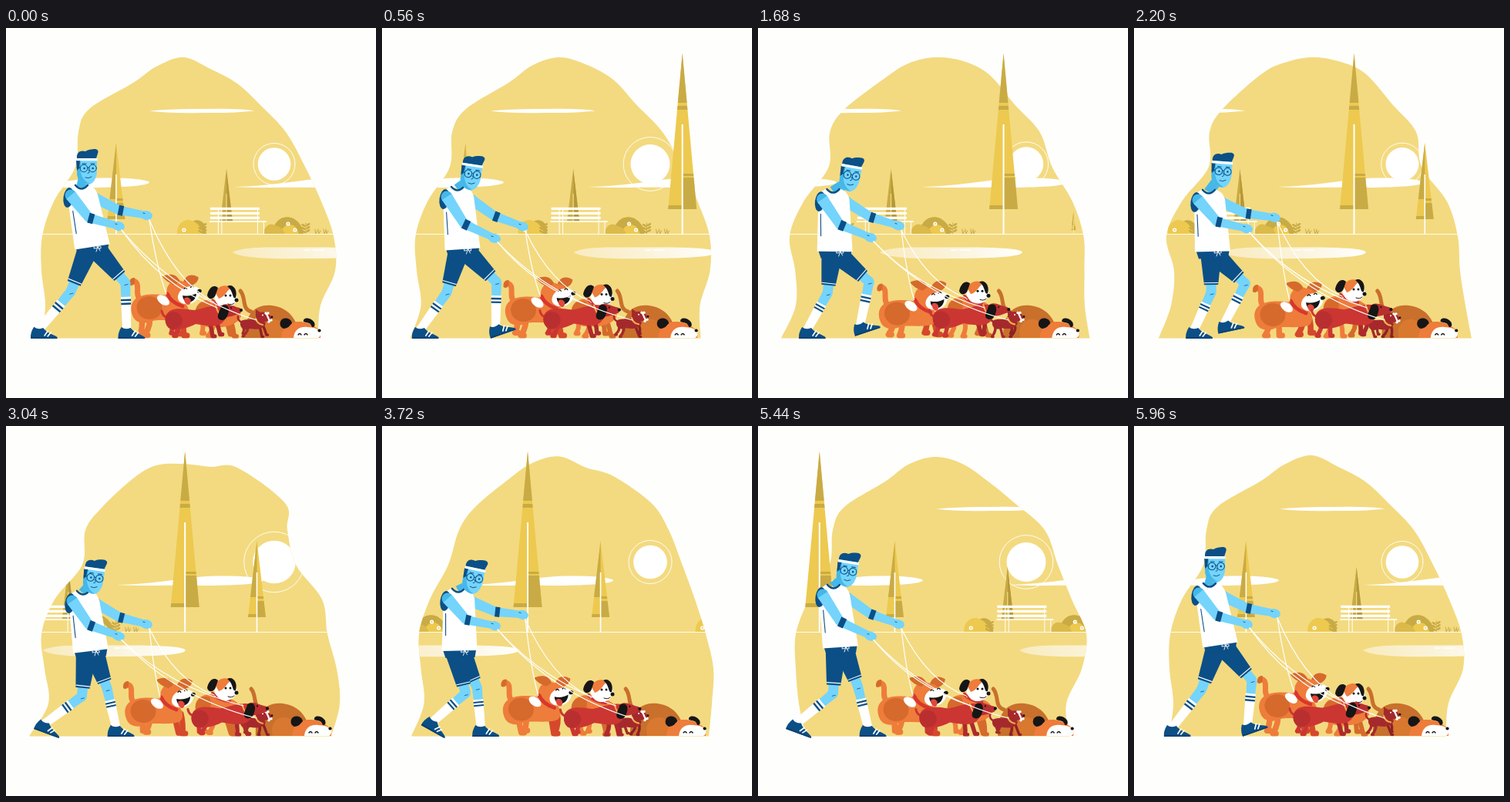
Recreate the animation shown at these times as an HTML page with a canvas. Size 480 by 480 pixels, loop 6000 ms.

```html
<!DOCTYPE html>
<html lang="en">
<head>
<meta charset="utf-8">
<title>Dog walk</title>
<style>
html, body { margin: 0; width: 100%; height: 100%; overflow: hidden; background: #fefefd; }
canvas { display: block; width: 100vmin; height: 100vmin; }
</style>
</head>
<body>
<canvas id="stage"></canvas>
<script>
const LOOP = 6000, STEP = 600, GROUND = 402.4, HORIZON = 267, TAU = Math.PI * 2;
const SAND = '#f3da80', GOLD = '#edc94f', DARK = '#c9ab45', DEEP = '#b6983a', WHITE = '#fff';
const NAVY = '#0b4f86', SKIN = '#74d4fb', SHADE = '#45b7e8', INK = '#161616';
const ORANGE = '#ee7c3b', RUST = '#d56a2c', RED = '#cb3632', WINE = '#a5292c', BROWN = '#c8702c';

const canvas = document.getElementById('stage');
const ratio = Math.max(1, window.devicePixelRatio || 1);
canvas.width = canvas.height = 480 * ratio;
const c = canvas.getContext('2d');

const mix = (a, b, k) => a + (b - a) * k;
const mixPt = (p, q, k) => [mix(p[0], q[0], k), mix(p[1], q[1], k)];
const rad = d => d * Math.PI / 180;
const mod = (a, n) => ((a % n) + n) % n;
const clamp = k => Math.max(0, Math.min(1, k));
const smooth = k => k * k * (3 - 2 * k);
const easeOut = k => 1 - (1 - clamp(k)) ** 2;

// Key poses share these times; the last one wraps to the first.
const times = [0, 1120, 2200, 3040, 4400, 5440, LOOP];
function keyed(rows, t) {
  let i = 0;
  while (t >= times[i + 1]) i++;
  const e = smooth((t - times[i]) / (times[i + 1] - times[i]));
  const next = rows[(i + 1) % rows.length];
  return rows[i].map((v, j) => mix(v, next[j], e));
}

// Blob outline: x at left heights, y across the top, x at right heights.
const leftY = [GROUND, 360, 315, 270, 225, 180, 135, 105];
const topX = [165, 195, 230, 265, 300];
const rightY = [100, 135, 180, 225, 270, 315, 360, GROUND];
const blobs = [
  [45, 51, 46, 47, 62, 90, 94, 108, 71, 50, 38, 53, 72, 330, 363, 388, 409, 425, 427, 408, 405],
  [28, 50, 44, 40, 56, 86, 88, 110, 70, 47, 38, 42, 62, 331, 365, 391, 410, 425, 424, 417, 422],
  [32, 48, 52, 42, 62, 97, 98, 115, 60, 45, 38, 43, 59, 336, 366, 373, 406, 420, 423, 430, 438],
  [30, 55, 50, 46, 63, 99, 103, 125, 68, 51, 49, 53, 54, 362, 365, 376, 410, 417, 429, 433, 422],
  [46, 54, 51, 50, 61, 73, 97, 117, 69, 45, 30, 55, 76, 337, 379, 403, 402, 423, 431, 423, 426],
  [62, 53, 49, 49, 66, 93, 97, 112, 72, 50, 40, 49, 73, 333, 372, 389, 407, 426, 420, 400, 404]
];

// neck x y, hip x y, hip tilt, head x y tilt, big dog x y, spotted dog y
const poses = [
  [97, 204, 112, 284, -9, 105, 180, 0, 0, 0, 0],
  [97, 208, 97, 290, 2, 127, 195, 17, -5, 6, -3],
  [96, 210, 102, 290, -1, 114, 184, 4, -6, 9, -8],
  [99, 214, 110, 292, -7, 114, 195, 8, -8, 7, -7],
  [97, 208, 91, 291, 5, 124, 195, 16, -3, 2, -3],
  [97, 206, 107, 287, -4, 116, 186, 9, -7, 5, -6]
];

// Foot path over two steps: time, x, y, tilt, knee bend
const footKeys = [
  [0, 163, 403, 0, 20], [40, 149, 403, 0, 3], [200, 120, 403, 0, 13], [600, 49, 403, 0, 9],
  [640, 52, 399, 20, 23], [800, 79, 394, 38, 33], [1000, 126, 393, -12, 34],
  [1120, 150, 395, -22, 25], [1160, 157, 397, -20, 22], [1200, 163, 403, 0, 20]
];

function fill(d, color) { c.fillStyle = color; c.fill(new Path2D(d)); }
function line(d, color, w) { c.strokeStyle = color; c.lineWidth = w; c.stroke(new Path2D(d)); }
function oval(x, y, rx, ry, color, turn = 0) {
  c.fillStyle = color;
  c.beginPath();
  c.ellipse(x, y, rx, ry, rad(turn), 0, TAU);
  c.fill();
}
function dot(x, y, r, color) { oval(x, y, r, r, color); }
function ring(x, y, r, color, w) {
  c.strokeStyle = color;
  c.lineWidth = w;
  c.beginPath();
  c.arc(x, y, r, 0, TAU);
  c.stroke();
}
function rect(x, y, w, h, color) { c.fillStyle = color; c.fillRect(x, y, w, h); }
function at(x, y, draw, turn = 0) {
  c.save();
  c.translate(x, y);
  c.rotate(rad(turn));
  draw();
  c.restore();
}
function scaled(x, y, k, draw) {
  if (k <= 0) return;
  c.save();
  c.translate(x, y);
  c.scale(k, k);
  c.translate(-x, -y);
  draw();
  c.restore();
}
// Tapered limb segment between two fractions of p-q.
function limb(p, q, w1, w2, color, from = 0, to = 1) {
  const n = Math.hypot(q[0] - p[0], q[1] - p[1]) || 1;
  const nx = -(q[1] - p[1]) / n, ny = (q[0] - p[0]) / n;
  const a = mixPt(p, q, from), b = mixPt(p, q, to);
  const u = mix(w1, w2, from) / 2, v = mix(w1, w2, to) / 2;
  c.fillStyle = color;
  c.beginPath();
  c.moveTo(a[0] + nx * u, a[1] + ny * u);
  c.lineTo(b[0] + nx * v, b[1] + ny * v);
  c.lineTo(b[0] - nx * v, b[1] - ny * v);
  c.lineTo(a[0] - nx * u, a[1] - ny * u);
  c.fill();
}
// Middle joint: halfway along p-q, pushed sideways by bend.
function joint(p, q, bend) {
  const dx = q[0] - p[0], dy = q[1] - p[1], d = Math.hypot(dx, dy);
  const [x, y] = mixPt(p, q, .48);
  return [x + dy / d * bend, y - dx / d * bend];
}

function blobPath(t) {
  const b = keyed(blobs, t);
  const pts = [
    ...leftY.map((y, i) => [b[i], y]),
    ...topX.map((x, i) => [x, b[8 + i]]),
    ...rightY.map((y, i) => [b[13 + i], y])
  ];
  const path = new Path2D(), last = pts.length - 1;
  path.moveTo(...pts[0]);
  for (let i = 0; i < last; i++) {
    const p0 = pts[Math.max(0, i - 1)], p1 = pts[i], p2 = pts[i + 1], p3 = pts[Math.min(last, i + 2)];
    path.bezierCurveTo(
      p1[0] + (p2[0] - p0[0]) / 6, p1[1] + (p2[1] - p0[1]) / 6,
      p2[0] - (p3[0] - p1[0]) / 6, p2[1] - (p3[1] - p1[1]) / 6, ...p2);
  }
  path.closePath();
  return path;
}

// Repeats a prop that travels one period to the left per loop.
function scroll(t, x, period, draw) {
  for (let k = 0; k < 3; k++) {
    const px = x + period * (k - t / LOOP);
    at(px, 0, () => draw(px));
  }
}
// Towers grow out of the horizon on the right and sink back on the left.
function tower(t, x, period, draw) {
  scroll(t, x, period, px => {
    scaled(0, HORIZON, Math.min(easeOut((px - 58) / 22), easeOut((412 - px) / 20)), draw);
  });
}

function tallTower() {
  fill('M0 33L18.5 235H-18.5Z', GOLD);
  fill('M0 33L5.9 97H-5.9Z', DARK);
  fill('M6.2 101L6.7 106H-6.7L-6.2 101Z', DARK);
  fill('M0 189H14.3L14.6 192H0ZM0 194H14.8L18.5 235H0Z', DARK);
  fill('M-18 230H0V235H-18.5Z', DARK);
  rect(-1, 125, 2, 142, WHITE);
}
function midTower() {
  fill('M0 149L11.5 248H-11.5Z', GOLD);
  fill('M0 149V222H-8.5Z', DARK);
  fill('M0 227H9.1L11.5 248H0ZM0 221H8.4L8.7 224H0Z', DARK);
  fill('M-11 244H0V248H-11.5Z', DARK);
  rect(-.8, 190, 1.6, 77, WHITE);
}
function smallTower() {
  fill('M0 183L8 251H-8Z', DARK);
  fill('M0 183L8 251H1Z', DEEP);
  rect(-.6, 215, 1.2, 52, SAND);
}
function flower(x, y) { dot(x, y, 2.6, WHITE); dot(x, y, 1.1, GOLD); }
function sprig(x) {
  for (let i = 0; i < 3; i++) {
    oval(x - 3, 264 - i * 4, 3, 1.4, DARK, 30);
    oval(x + 3, 263 - i * 4, 3, 1.4, DARK, -30);
  }
  line(`M${x} 267V253`, DARK, 1);
}
function bench() {
  for (const y of [232.8, 238.8, 244.8]) rect(1, y, 64, 3.2, WHITE);
  rect(0, 250.3, 74, 1.6, WHITE);
  for (const x of [11, 15.5, 62]) rect(x, 233, 1, 34, WHITE);
  rect(70, 251, 1, 16, WHITE);
}
function parkProps(px) {
  fill('M-30 267C-27 249-15 245-7 254Q-4 260-4 267Z', DARK);
  fill('M-42 267C-43 253-31 246-23 250C-14 253-9 260-9 267Z', GOLD);
  flower(-33, 262);
  sprig(-9);
  fill('M82 267C82 250 96 241 109 247Q121 254 122 267Z', DARK);
  fill('M92 267C94 254 111 248 116 267Z', GOLD);
  fill('M70 267C71 256 80 251 87 257Q94 257 98 267Z', '#dcba4a');
  flower(102, 254);
  flower(111, 262);
  sprig(125);
  for (const x of [138, 142, 149, 152]) line(`M${x} 267l-1-6M${x} 267l2-4`, DARK, 1);
  scaled(37, HORIZON, easeOut((388 - px) / 20), bench);
}
function pond() {
  const g = c.createLinearGradient(0, 0, 185, 0);
  g.addColorStop(0, '#f9ebbf');
  g.addColorStop(.5, '#fbf3d9');
  g.addColorStop(1, WHITE);
  fill('M0 291C15 282 60 285 95 284.5C150 284 185 286 185 291C185 297 140 299 95 299C45 300 10 298 0 291Z', g);
  line('M93 288H100M104 288H117', WHITE, 1.4);
}

function scenery(t) {
  c.save();
  c.clip(blobPath(t));
  rect(0, 0, 480, 480, SAND);
  const pulse = smooth((1 - Math.cos(t / 2000 * TAU)) / 2);
  dot(348, 176.5, 21.3 + 6.5 * pulse, WHITE);
  ring(348, 176.5, 27 + 12.3 * pulse, WHITE, .9);
  scroll(t, 186, 486, () => fill('M0 107.5Q30 104.5 70 105Q118 104 136 107.5Q110 110.5 70 110Q25 111 0 107.5Z', WHITE));
  scroll(t, -4, 300, () => fill('M0 206C45 205 75 199 105 196C135 193 185 195 190 200C190 205 150 207 110 207C70 206 40 208 0 206Z', WHITE));
  tower(t, 286, 405, smallTower);
  scroll(t, 264, 486, parkProps);
  rect(0, HORIZON, 480, .9, WHITE);
  scroll(t, 294, 486, pond);
  c.restore();
  tower(t, 44.3, 381, tallTower);
  tower(t, 143, 370, midTower);
}

function paws(t, xs, top, w, colors, base = 400) {
  xs.forEach((x, i) => {
    const a = t / STEP * TAU + i * 2.4;
    const fx = x + 6 * Math.sin(a), fy = base - 4 * Math.max(0, Math.cos(a));
    line(`M${x} ${top}Q${x + 3} ${(top + fy) / 2} ${fx} ${fy}l${w * .5} 0`, colors[i % 2], w);
  });
}

function sniffer(t) {
  const x = 7 * (1 - Math.cos(t / LOOP * TAU));
  at(x, 0, () => {
    line('M318 368C305 364 312 350 304 341', BROWN, 5);
    fill('M310 402C308 374 322 357 345 360C368 363 380 380 379 402Z', BROWN);
    fill('M332 402C328 388 336 376 350 378C362 382 364 394 362 402Z', '#d9782f');
    fill('M357 402C358 386 370 380 383 381C396 382 405 390 408 394V402Z', ORANGE);
    fill('M373 402C374 391 382 387 391 388Q403 388 408 394Q409 400 405 402Z', WHITE);
    fill('M371 383C368 386 366 390 360 390C355 388 354 382 358 378C363 375 370 377 371 383Z', INK);
    fill('M386 381C385 375 395 375 400 382Q402 388 397 388C395 381 391 383 386 381Z', INK);
    line('M379 398q2-3 4 0M387 398q2-3 4 0', INK, 1.4);
    dot(406.5, 392.5, 2.1, INK);
  });
}

function spotted(t, y) {
  paws(t, [254, 292, 268, 286], 380, 6, [ORANGE, RUST]);
  at(0, y * .6, () => {
    fill('M246 372C244 356 258 350 272 353C292 356 304 362 305 374C300 386 282 390 262 388Q248 386 246 372Z', ORANGE);
    fill('M246 372C244 360 254 353 264 356C270 368 260 384 252 384Z', RUST);
  });
  at(0, y, () => {
    line('M268 354Q274 362 290 364', RED, 4.5);
    for (let i = 0; i < 3; i++) dot(271 + 6 * i, 357.5 + 2.3 * i, .8, WHITE);
    oval(285, 349, 14.5, 14, WHITE, 20);
    fill('M272 344C273 335 285 331 292 337C286 341 284 349 276 351Z', ORANGE);
    fill('M275 337C268 331 262 340 261 347C264 355 271 350 272 346Z', INK);
    fill('M287 335C295 331 301 341 298 350C293 352 296 342 287 335Z', INK);
    dot(285, 347, 1.5, INK);
    dot(291, 347, 1.5, INK);
    dot(299, 353, 2.5, INK);
    line('M288 358q5 2 8-1', INK, 1);
  });
}

function bigDogHead() {
  oval(222, 341, 15, 15, ORANGE);
  line('M208 345Q213 357 229 362', '#d9372c', 5);
  fill('M219 333C213 330 207 329 201 321C210 316 221 317 225 327Z', RUST);
  fill('M230 328C233 319 242 316 251 322C250 332 239 334 235 334Z', RUST);
  fill('M215 338C218 328 231 325 238 331L246 338L226 351Z', ORANGE);
  fill('M223 346C226 336 241 331 251 337C256 345 249 357 238 359C227 360 220 354 223 346Z', WHITE);
  fill('M229 347Q240 349 248 344C248 352 242 357 236 357Q229 354 229 347Z', INK);
  fill('M231 351Q236 347 240 353Q241 360 236 360Q231 358 231 351Z', '#e0483c');
  oval(252, 341, 3.2, 2.5, INK, -20);
  line('M231 338q2-3 4 0M240 336q2-3 4 0', INK, 1.4);
}

function bigDog(t, x, y) {
  paws(t, [175, 227, 186, 218], 370 + y / 2, 7.5, [ORANGE, '#d5482c'], 399);
  at(x, y, () => {
    line('M174 352C166 345 176 331 165 328', ORANGE, 7);
    fill('M160 333Q159 324 167 324L167 331Q164 336 160 333Z', RUST);
    fill('M170 350C182 343 205 345 222 350C236 355 241 369 234 376C222 382 200 377 190 380C180 385 169 383 165 375C160 364 162 355 170 350Z', ORANGE);
    oval(186, 363, 16.5, 15, RUST, 10);
    oval(204, 353, 9, 5.5, WHITE, 35);
    scaled(232, 345, .94, bigDogHead);
  });
}

function littleDog(t) {
  paws(t * 2, [307, 328, 313, 333], 385, 3.4, [WINE, '#8d2125'], 400.5);
  const y = Math.sin(t / 300 * TAU);
  at(0, y, () => {
    line('M306 382Q300 379 301 374', WINE, 2.5);
    fill('M304 381C308 376 321 380 330 376L337 383C334 392 325 391 317 390C309 393 303 390 304 381Z', WINE);
    fill('M324 375L324 365L330 369C337 367 342 372 345 375Q345 380 337 381L328 384Z', WINE);
    line('M324 377Q326 384 333 385', '#efb04a', 2.2);
    line('M338 371L342 380', WHITE, 2.2);
    for (const [x, q] of [[337, 370], [340, 370], [341, 381], [344, 379]]) dot(x, q, 1.7, WHITE);
    dot(333, 372.5, 1, WHITE);
    dot(345, 375, 1.4, INK);
  });
}

function dachshund(t) {
  const x = 17 * (1 - Math.cos(t / LOOP * TAU)), y = Math.sin(t / STEP * TAU);
  at(x, y, () => {
    paws(t, [214, 264, 224, 273], 381, 5.5, [RED, '#ad2a2c']);
    line('M210 376Q203 374 202 367', RED, 3);
    fill('M207 374C212 361 228 364 244 366C260 363 272 357 284 361C291 366 287 376 281 382C272 390 257 385 246 384C235 390 220 393 211 389Q205 383 207 374Z', RED);
    fill('M207 374C214 363 229 369 229 380C227 391 216 393 211 389Q205 383 207 374Z', '#b92f2f');
    fill('M278 362C284 354 293 361 303 363Q308 366 304 370C296 373 291 375 282 375Z', '#b92f2f');
    line('M272 360Q275 371 282 377', '#efb04a', 2);
    fill('M279 361C288 356 291 364 288 371C286 380 278 381 275 376C274 370 278 367 279 361Z', INK);
    dot(305, 366, 2.1, INK);
    dot(292, 363, 1.1, INK);
  });
  return x;
}

function foot(t) {
  const u = mod(t, STEP * 2);
  let i = 0;
  while (u >= footKeys[i + 1][0]) i++;
  const a = footKeys[i], b = footKeys[i + 1], k = (u - a[0]) / (b[0] - a[0]);
  return a.map((v, j) => mix(v, b[j], k));
}

function leg(t, hx, hy) {
  const [, fx, fy, turn, bend] = foot(t);
  const r = rad(turn), px = -6, py = -12;
  const ankle = [fx + px * Math.cos(r) - py * Math.sin(r), fy + px * Math.sin(r) + py * Math.cos(r)];
  const hip = [hx + Math.max(-1, Math.min(1, (fx - 105) / 55)) * 6, hy + 4];
  const knee = joint(hip, ankle, bend);
  limb(hip, knee, 14, 13, SKIN);
  dot(...knee, 6.5, SKIN);
  limb(knee, ankle, 13, 9, SKIN);
  limb(knee, ankle, 14, 11, WHITE, .3, 1.04);
  limb(knee, ankle, 14.2, 11.2, NAVY, .35, .39);
  limb(knee, ankle, 14.2, 11.2, NAVY, .43, .47);
  line(`M${knee[0] - 1} ${knee[1] + 3}l4-1`, NAVY, .8);
  at(fx, fy, () => {
    fill('M-17 0Q-18-7-13-15Q-8-11-1-14C3-8 11-6 16-3Q19-1 17 0Z', NAVY);
    fill('M-17-2.2L17-1.2L17 0H-17Z', '#0a3f70');
    line('M1-4L5-10M5-3L9-8', WHITE, 1.7);
  }, turn);
  dot(...hip, 13, NAVY);
  limb(hip, knee, 27, 16, NAVY, 0, .8);
  limb(hip, knee, 27, 16, WHITE, .74, .76);
}

function arm(p, hand, bend, w) {
  const e = joint(p, hand, bend);
  dot(...p, w / 2, SHADE);
  limb(p, e, w, 12, SKIN);
  dot(...e, 6, SKIN);
  limb(e, hand, 12, 9, SKIN);
  limb(e, hand, 13, 12, NAVY, -.02, .15);
  oval(hand[0] - 1, hand[1], 8, 6, SKIN, 12);
  line(`M${hand[0] - 5} ${hand[1] - 3}l2 .6`, NAVY, .9);
}

function head(x, y, turn) {
  at(x, y, () => {
    fill('M-13-12H13V7C12 16 8 23 1 23C-7 22-13 16-13 8Z', SKIN);
    fill('M-13-10H-8V8Q-5 19 4 22C-7 24-13 16-13 8Z', SHADE);
    fill('M-13-11C-14-19-8-22-2-20C3-23 9-23 11-23Q16-22 14-17Q13-14 12-11Z', NAVY);
    fill('M-14-8H-9L-10 2L-13 5Z', NAVY);
    rect(-13.5, -11, 27, 3.2, WHITE);
    ring(-4, 2, 4.8, NAVY, 1);
    ring(7.5, 2, 4.8, NAVY, 1);
    line('M.8 1h2M-9 1h-4M-6-4h5M5-4h5', NAVY, 1);
    dot(-3.4, 2, 1.3, NAVY);
    dot(7.6, 2, 1.3, NAVY);
    line('M2 4q3 4-1 4.5M-2 14q4 2 8-1', NAVY, .9);
  }, turn);
}

function man(t, p, near, far) {
  const [nx, ny, hx, hy, tilt, kx, ky, turn] = p;
  arm([nx + 19, ny + 17], far, -5, 14);
  leg(t, hx, hy);
  leg(t + STEP, hx, hy);
  const r = rad(tilt);
  const hem = dx => [hx + dx * Math.cos(r), hy + dx * Math.sin(r)];
  const [lx, ly] = hem(-23), [rx, ry] = hem(23);
  fill(`M${lx + 1} ${ly - 3}L${rx - 1} ${ry - 3}L${rx - 3} ${ry + 9}L${lx + 5} ${ly + 9}Z`, NAVY);
  const jaw = [kx - 4 - turn * .2, ky + 12];
  limb([nx + 1, ny + 3], jaw, 14, 13, SHADE);
  fill(`M${nx - 18} ${ny + 9}Q${nx - 14} ${ny + 2} ${nx - 7} ${ny - 1}Q${nx + 1} ${ny + 8} ${nx + 9} ${ny - 1}` +
    `Q${nx + 19} ${ny + 2} ${nx + 22} ${ny + 12}L${rx} ${ry}L${lx} ${ly}Z`, WHITE);
  line(`M${nx - 7} ${ny}Q${nx + 1} ${ny + 9} ${nx + 9} ${ny}`, NAVY, 2.6);
  line(`M${mix(nx - 12, lx, .4)} ${mix(ny, ly, .4)}L${mix(nx - 9, lx + 3, .75)} ${mix(ny, ly, .75)}`, NAVY, 1.1);
  line(`M${hx + 7} ${hy}q-5-4-5 2q5 0 5-2q5-3 4 2q-3 1-4-2l-2 6m2-6l3 5`, WHITE, .9);
  head(kx, ky, turn);
  const s = [nx - 14, ny + 13];
  oval(s[0] - 2, s[1] + 3, 6.5, 13, NAVY, 8);
  arm([s[0] + 1, s[1]], near, -12, 15);
}

function leash(a, b, sag) {
  line(`M${a[0]} ${a[1]}Q${mix(a[0], b[0], .4)} ${mix(a[1], b[1], .6) + sag} ${b[0]} ${b[1]}`, WHITE, 1.2);
}

function draw(t) {
  c.setTransform(ratio, 0, 0, ratio, 0, 0);
  c.lineCap = 'round';
  c.lineJoin = 'round';
  rect(0, 0, 480, 480, '#fefefd');
  scenery(t);

  const p = keyed(poses, t), [ax, ay, cy] = p.slice(8);
  const dip = 8 * (1 - Math.cos((t + 20) / (STEP * 2) * TAU));
  const near = [147, 257 + dip], far = [183, 243 + dip * .9];

  c.save();
  c.beginPath();
  c.rect(0, 0, 480, GROUND);
  c.clip();
  sniffer(t);
  spotted(t, cy);
  bigDog(t, ax, ay);
  littleDog(t);
  const bx = dachshund(t);
  c.restore();

  man(t, p, near, far);
  const n = [near[0] + 3, near[1] + 5], f = [far[0] + 3, far[1] + 6];
  leash(n, [274 + bx, 363], 10);
  leash(n, [325, 379], 14);
  leash(f, [208 + ax, 345 + ay], 2);
  leash(f, [270, 356 + cy], 16);
}

function tick() {
  draw(performance.now() % LOOP);
  requestAnimationFrame(tick);
}
tick();
</script>
</body>
</html>
```
